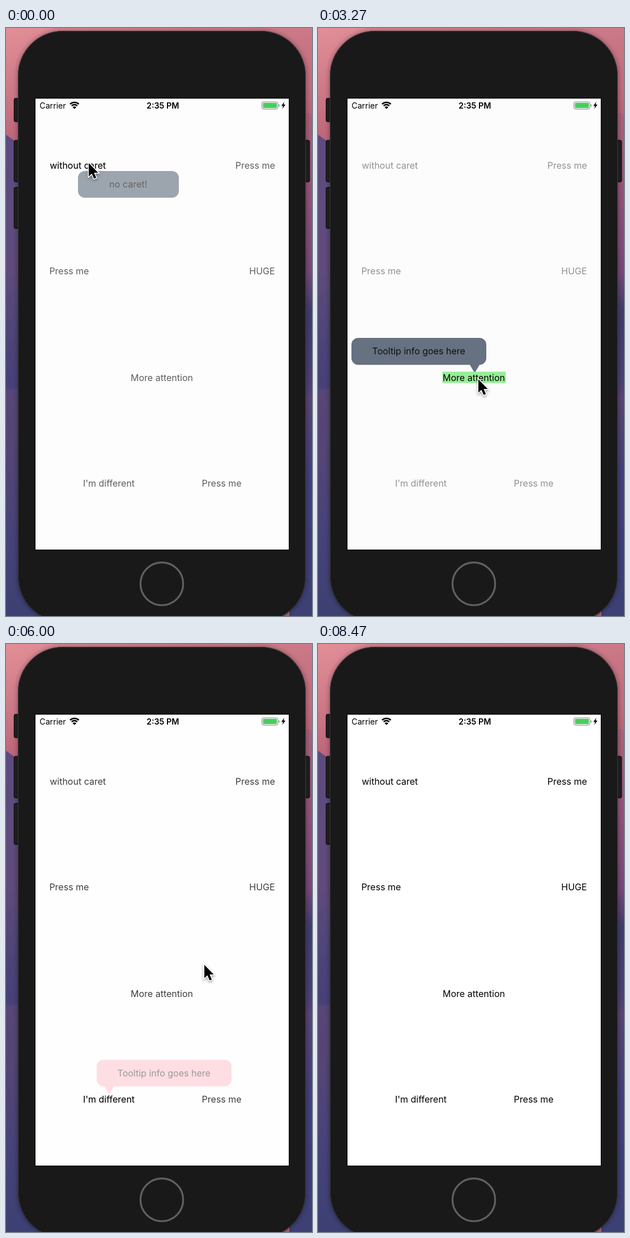
Animation of 540x1036 px, one loop 8540 ms. Source, as an HTML page with a canvas:

```html
<!DOCTYPE html>
<html lang="en">
<head>
<meta charset="utf-8">
<title>Tooltip demo</title>
<style>
  html, body { margin: 0; width: 100%; height: 100%; overflow: hidden; background: #4b4379; }
  canvas { display: block; }
</style>
</head>
<body>
<canvas id="stage" width="540" height="1036"></canvas>
<script>
const W = 540, H = 1036, LOOP = 8540, FADE = 333;
const FONT = 'Inter, "Open Sans", sans-serif';
const SLATE = '#5d697a', PINK = '#feaeba';

const ctx = document.getElementById('stage').getContext('2d');
const newLayer = () => Object.assign(document.createElement('canvas'), { width: W, height: H }).getContext('2d');
const modal = newLayer();

// Labels: text, centre x, baseline
const labels = [
  ['without caret', 126.7, 248],
  ['Press me', 439.7, 248],
  ['Press me', 111.4, 434.3],
  ['HUGE', 452, 434.3],
  ['More attention', 275, 621.5],
  ["I'm different", 181.5, 808],
  ['Press me', 380.6, 808]
];

const info = ['Tooltip info goes here'];
const tips = [
  { label: 0, from: -200, to: 670, box: [127, 252, 178, 47], lines: ['no caret!'] },
  { label: 1, from: 1190, to: 2067, box: [223, 264, 238, 47], lines: info, caret: [440.5, 264, -15] },
  { label: 4, from: 2957, to: 4050, box: [59, 546, 238, 47.5], lines: info, caret: [276.5, 593, 15],
    mark: [219.5, 605.5, 112, 20, '#90ee90'] },
  { label: 5, from: 4760, to: 5800, box: [160, 732.5, 238, 47], lines: info, caret: [182, 779, 15], color: PINK },
  { label: 3, from: 6577, to: 7900, box: [116, 450.3, 357.5, 178.7], caret: [452, 451, -15],
    mark: [429, 418.5, 46, 19.5, '#c2c3c5'],
    lines: [
      'Some big text full of important stuff ment',
      'for the super duper user that our design',
      'carefully created for us just becuase he',
      'super likes me and you and all the world',
      'bro, congratulations for reading until now'
    ] }
];

// Pointer stops: time, x, y
const stops = [
  [0, 146, 238], [300, 146, 238], [900, 419, 243], [1700, 419, 243], [2150, 341, 416],
  [2260, 341, 416], [2800, 283, 619], [3700, 283, 619], [4550, 194, 795], [5450, 194, 795],
  [6400, 446, 424], [7650, 446, 424], [8250, 566, 500], [LOOP, 566, 500]
];

const clamp = v => Math.min(1, Math.max(0, v));
const smooth = v => v * v * (3 - 2 * v);

function text(c, str, x, y, { size = 16, weight = 400, align = 'center', color = '#000' } = {}) {
  c.font = `${weight} ${size}px ${FONT}`;
  c.textAlign = align;
  c.fillStyle = color;
  c.fillText(str, x, y);
}

function round(c, x, y, w, h, r, fill) {
  c.beginPath();
  c.roundRect(x, y, w, h, r);
  if (fill) {
    c.fillStyle = fill;
    c.fill();
  }
}

function poly(c, points) {
  c.beginPath();
  points.forEach(([x, y]) => c.lineTo(x, y));
  c.closePath();
}

function gradient(c, colors) {
  const g = c.createLinearGradient(0, 0, 0, H);
  colors.forEach(([y, color]) => g.addColorStop(y / H, color));
  return g;
}

function drawWallpaper(c) {
  c.fillStyle = gradient(c, [[0, '#e28f98'], [100, '#cf7c89'], [205, '#bd6478']]);
  c.fillRect(0, 0, W, H);
  const side = c.createLinearGradient(0, 0, W, 0);
  side.addColorStop(0, 'rgba(170,85,110,0)');
  side.addColorStop(1, 'rgba(170,85,110,.4)');
  c.fillStyle = side;
  c.fillRect(0, 0, W, H);

  c.fillStyle = gradient(c, [[188, '#5d4b7f'], [420, '#604b7c'], [560, '#4c4478'],
    [632, '#47407a'], [640, '#574677'], [760, '#544576'], [880, '#474379'], [H, '#3d4073']]);
  poly(c, [[0, 188], [24, 205], [270, 400], [270, H], [0, H]]);
  c.fill();

  c.fillStyle = gradient(c, [[150, '#ac6279'], [280, '#95547a'], [430, '#78497a'],
    [500, '#403c6d'], [620, '#4a4074'], [650, '#594575'], [790, '#44407a'], [H, '#3c4075']]);
  c.fillRect(500, 150, 40, H);
}

function drawPhone(c) {
  const buttons = [[14, 124, 41], [14, 198, 73], [14, 281, 72], [526, 198, 73]];
  for (const [x, y, h] of buttons) {
    round(c, x + .5, y, 9, h, 3, '#222');
    c.strokeStyle = '#0d0d0d';
    c.lineWidth = 1.5;
    c.stroke();
  }
  c.save();
  c.shadowColor = 'rgba(0,0,0,.4)';
  c.shadowBlur = 10;
  round(c, 21, 5, 508, 1041, 79, '#191919');
  c.restore();
  round(c, 21.5, 5.5, 507, 1040, 79);
  c.strokeStyle = '#3c3a3c';
  c.lineWidth = 1;
  c.stroke();

  c.fillStyle = '#000';
  c.fillRect(51, 123, 449, 797);
  c.fillStyle = '#fff';
  c.fillRect(52, 124.5, 447, 794.5);

  c.beginPath();
  c.arc(275, 979.3, 37.7, 0, Math.PI * 2);
  c.strokeStyle = '#616161';
  c.lineWidth = 3.2;
  c.stroke();
}

function drawStatus(c) {
  text(c, 'Carrier', 82.5, 141.7, { size: 14.2 });
  text(c, '2:35 PM', 276.7, 141.7, { size: 14.3, weight: 600 });

  c.strokeStyle = '#000';
  c.lineWidth = 2.5;
  for (const r of [11, 7]) {
    c.beginPath();
    c.arc(120.8, 142, r, -Math.PI * .75, -Math.PI * .25);
    c.stroke();
  }
  c.beginPath();
  c.moveTo(120.8, 142.8);
  c.arc(120.8, 142.8, 4.6, -Math.PI * .75, -Math.PI * .25);
  c.fill();

  round(c, 451.7, 130, 28, 12.8, 3.2);
  c.strokeStyle = '#8f8f8f';
  c.lineWidth = 1.2;
  c.stroke();
  round(c, 453.5, 131.8, 24.4, 9.2, 1.6, '#45cf5b');
  round(c, 481, 134.4, 1.6, 4, 1, '#8f8f8f');
  c.fillStyle = '#000';
  poly(c, [[491.2, 130], [485.8, 137.2], [489, 137.2], [487.6, 142.6], [493.2, 135], [490, 135]]);
  c.fill();
}

function drawTip(tip, alpha) {
  const c = modal, [x, y, w, h] = tip.box, color = tip.color || SLATE;
  c.clearRect(0, 0, W, H);
  c.fillStyle = 'rgba(250,250,250,.62)';
  c.fillRect(52, 124.5, 447, 794.5);

  if (tip.caret) {
    const [cx, cy, len] = tip.caret;
    c.fillStyle = color;
    poly(c, [[cx - 8.8, cy], [cx + 8.8, cy], [cx, cy + len]]);
    c.fill();
  }
  round(c, x, y, w, h, 12, color);
  if (tip.lines.length > 1) {
    tip.lines.forEach((line, i) => text(c, line, 133.5, 505 + i * 19.9, { align: 'left' }));
  } else {
    text(c, tip.lines[0], x + w / 2 - .3, y + h / 2 + 5.6);
  }
  if (tip.mark) {
    const [mx, my, mw, mh, fill] = tip.mark;
    c.fillStyle = fill;
    c.fillRect(mx, my, mw, mh);
  }
  text(c, ...labels[tip.label]);

  ctx.globalAlpha = alpha;
  ctx.drawImage(c.canvas, 0, 0);
  ctx.globalAlpha = 1;
}

function drawPointer(t) {
  const i = stops.findIndex(s => s[0] > t);
  const [t0, x0, y0] = stops[i - 1], [t1, x1, y1] = stops[i];
  const k = smooth((t - t0) / (t1 - t0));
  ctx.save();
  ctx.translate(x0 + (x1 - x0) * k, y0 + (y1 - y0) * k);
  poly(ctx, [[0, 0], [0, 23.5], [5.4, 18.4], [9.4, 27.5], [13.2, 25.8], [9.3, 17], [16.6, 17]]);
  ctx.shadowColor = 'rgba(0,0,0,.4)';
  ctx.shadowBlur = 4;
  ctx.shadowOffsetY = 2;
  ctx.strokeStyle = '#fff';
  ctx.lineWidth = 3;
  ctx.stroke();
  ctx.shadowColor = 'transparent';
  ctx.fillStyle = '#000';
  ctx.fill();
  ctx.restore();
}

const backdrop = newLayer();
drawWallpaper(backdrop);
drawPhone(backdrop);

function frame() {
  const t = performance.now() % LOOP;
  ctx.drawImage(backdrop.canvas, 0, 0);
  labels.forEach(label => text(ctx, ...label));
  for (const tip of tips) {
    const alpha = clamp((t - tip.from) / FADE) * clamp(1 - (t - tip.to) / FADE);
    if (alpha > 0) drawTip(tip, alpha);
  }
  drawStatus(ctx);
  drawPointer(t);
  requestAnimationFrame(frame);
}
frame();
</script>
</body>
</html>
```
